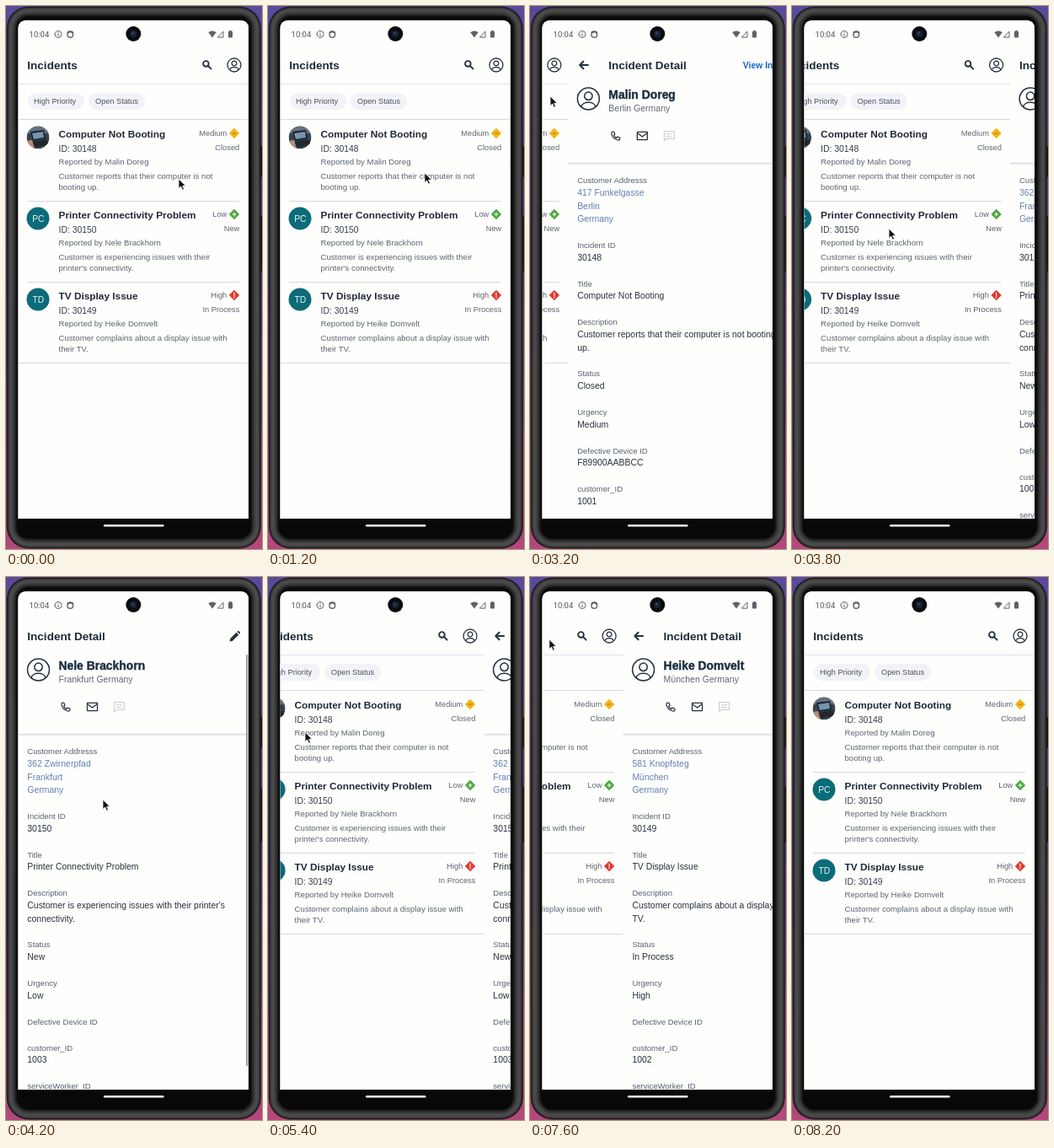
Recreate the animation shown at these times as an HTML page. Size 304 px wide and 644 px high, loop 8600 ms.

```html
<!DOCTYPE html>
<html lang="en">
<head>
<meta charset="utf-8">
<title>Incidents</title>
<style>
html, body { margin: 0; width: 100%; height: 100%; overflow: hidden; background: #201c3c; }
svg { display: block; width: 304px; height: 644px; }
text { font-family: "Liberation Sans", Arial, sans-serif; white-space: pre; }
.head { font: bold 13.55px "Liberation Sans", Arial, sans-serif; fill: #1f2a37; }
.row { font: bold 11.83px "Liberation Sans", Arial, sans-serif; fill: #1f2a37; }
.id { font-size: 10.4px; fill: #333e4a; }
.note { font-size: 9.65px; fill: #5c6570; }
.side { font-size: 9.3px; fill: #5c6570; }
.chip { font-size: 9.2px; fill: #4b5562; }
.name { font: bold 13.9px "Liberation Sans", Arial, sans-serif; fill: #1d2f40; stroke: #1d2f40; stroke-width: .4px; }
.city { font-size: 10.5px; fill: #5c6876; }
.label { font-size: 9.5px; fill: #56616e; }
.value { font-size: 10.45px; fill: #27323e; }
.link { font-size: 10.45px; fill: #6480b4; }
.act { font: bold 10.4px "Liberation Sans", Arial, sans-serif; fill: #1766c2; }
.clock { font: 9.5px Roboto, sans-serif; fill: #55555a; }
.init { font-size: 10.3px; fill: #e4f3f5; text-anchor: middle; }
.end { text-anchor: end; }
</style>
</head>
<body>
<svg id="stage" viewBox="0 0 304 644"></svg>
<script>
const LOOP = 8600, TICK = 200, WIDTH = 273;
const INK = '#27323e', PAPER = '#fefefd';

const people = [
  { name: 'Malin Doreg', city: 'Berlin', street: '417 Funkelgasse', id: '30148', title: 'Computer Not Booting',
    row: ['Customer reports that their computer is not', 'booting up.'],
    full: ['Customer reports that their computer is not booting', 'up.'],
    status: 'Closed', urgency: 'Medium', color: '#f3b414', mark: 'M-2 0H2', device: 'F89900AABBCC', customer: '1001' },
  { name: 'Nele Brackhorn', city: 'Frankfurt', street: '362 Zwirnerpfad', id: '30150', title: 'Printer Connectivity Problem',
    row: ['Customer is experiencing issues with their', 'printer\'s connectivity.'],
    full: ['Customer is experiencing issues with their printer\'s', 'connectivity.'],
    status: 'New', urgency: 'Low', color: '#4ba83c', mark: 'M-2 0H2M0 -2V2', initials: 'PC', customer: '1003' },
  { name: 'Heike Domvelt', city: 'München', street: '581 Knopfsteg', id: '30149', title: 'TV Display Issue',
    row: ['Customer complains about a display issue with', 'their TV.'],
    full: ['Customer complains about a display issue with their', 'TV.'],
    status: 'In Process', urgency: 'High', color: '#e2382c', mark: 'M0 -3V.8M0 2V3', initials: 'TD', customer: '1002' }
];

// start, end, share of the detail page before and after, person
const slides = [
  [1500, 2174, 0, 1, 0], [3100, 3578, 1, 0, 0],
  [3700, 4200, 0, 1, 1], [5000, 5506, 1, 0, 1],
  [6100, 6400, 0, 1, 2], [7400, 7900, 1, 0, 2]
];
// time, x, y
const pointer = [
  [0, 205, 205], [600, 186, 198], [2400, 186, 198], [2900, 30, 70], [3000, 30, 70],
  [3200, 24, 107], [3600, 115, 264], [4200, 115, 264], [4800, 31, 70], [5200, 31, 70],
  [5400, 44, 184], [5900, 67, 356], [6400, 67, 356], [7200, 30, 70], [7400, 30, 70], [8200, -16, 96]
];
// inset and colour of the phone's rounded edge, from outside in
const rim = [[0, '#1c1c1d'], [1.5, '#383839'], [3, '#4a4a4a'], [6.5, '#3f3f3f'], [8.5, '#2c2c2c'], [10.5, '#171717'], [12, '#080808']];

const text = (s, x, y, cls) => `<text x="${x}" y="${y}" class="${cls}">${s}</text>`;
const rect = (x, y, w, h, fill, r = 0) => `<rect x="${x}" y="${y}" width="${w}" height="${h}" rx="${r}" fill="${fill}"/>`;
const disc = (x, y, r, fill) => `<circle cx="${x}" cy="${y}" r="${r}" fill="${fill}"/>`;
const line = (d, color = INK, w = 1.3) =>
  `<path d="${d}" fill="none" stroke="${color}" stroke-width="${w}" stroke-linecap="round" stroke-linejoin="round"/>`;
const at = (x, y, s, k = 1) => `<g transform="translate(${x} ${y}) scale(${k})">${s}</g>`;
const group = (id, s) => `<g id="${id}">${s}</g>`;

const person = w => line('M-8 0a8 8 0 1 0 16 0a8 8 0 1 0 -16 0M-2.9 -2a2.9 2.9 0 1 0 5.8 0a2.9 2.9 0 1 0 -5.8 0' +
  'M-5.2 5.9C-4.6 1.6 4.6 1.6 5.2 5.9', INK, w);
const phone = line('M-4.6 -4.6L-2.4 -5L-1 -2L-2.4 -.8Q-1.2 1.4 .8 2.4L2 1L5 2.4L4.6 4.6Q4 5.4 2.4 5Q-4 3 -5 -2.4Q-5.3 -4 -4.6 -4.6Z', INK, 1.2);
const mail = line('M-6 -4.6H6V4.6H-6ZM-6 -3.6L0 1L6 -3.6', INK, 1.3);
const chat = line('M-6 -5.4H6V3.4H-3L-6 6ZM-3 -2.5H3M-3 .4H2', '#cdd0d5', 1.2);
const pencil = `<path d="M-6 6L-5.2 2.4L2 -4.8L4.8 -2L-2.4 5.2ZM2.9 -5.6L4.1 -6.6Q5 -6.8 6.2 -5.4Q6.8 -4.6 6.4 -4L5.6 -2.9Z" fill="${INK}"/>`;

function photo() {
  return `<g clip-path="url(#round)">` + disc(38, 156, 13.5, '#39434c') + rect(24, 142, 28, 9, '#65727b') +
    `<path d="M29 149L45 147L47 157L32 160Z" fill="#172331"/><path d="M31 151L44 149L45 156L33 158Z" fill="#7595ad"/>` +
    `<path d="M31 161L48 158L51 164L35 168Z" fill="#20272d"/><path d="M24 160L31 159L34 170H26Z" fill="#b78f7d"/></g>`;
}

function listRow(p, i) {
  const avatar = p.initials
    ? disc(38, 156, 13.5, '#0c6b78') + text(p.initials, 38.3, 160, 'init') : photo();
  const diamond = `<path d="M0 -6.2L6.2 0L0 6.2L-6.2 0Z" fill="${p.color}"/>` + line(p.mark, i ? '#fff' : '#b97808', 1.1);
  return at(0, i * 96, avatar + text(p.title, 62.5, 156, 'row') + text('ID: ' + p.id, 62.5, 173, 'id') +
    text('Reported by ' + p.name, 62.5, 188, 'note') +
    p.row.map((s, n) => text(s, 62.5, 205 + n * 13, 'note')).join('') +
    text(p.urgency, 262.3, 154, 'side end') + text(p.status, 277.3, 171.3, 'side end') + at(271, 151, diamond) +
    (i < 2 ? rect(25, 231, 252, 1, '#d9dade') : rect(15, 231, WIDTH, 1, '#d9dade')));
}

function listPage() {
  return rect(14, 17, WIDTH + 1, 592, PAPER) + text('Incidents', 25.3, 75, 'head') +
    at(238, 69, line('M-3.9 -.6a3.3 3.3 0 1 0 6.6 0a3.3 3.3 0 1 0 -6.6 0M2 2L5.6 5.6', INK, 1.9)) +
    at(271, 70, person(1.3)) + rect(14, 92, WIDTH + 1, 1, '#dfe2ee') +
    rect(26, 103, 67, 20, '#f2f2f8', 10) + rect(98, 103, 67, 20, '#f2f2f8', 10) +
    text('High Priority', 33, 116, 'chip') + text('Open Status', 106, 116, 'chip') +
    rect(14, 134, WIDTH + 1, 1, '#d9dade') + people.map(listRow).join('');
}

function detailPage(p, i) {
  let s = at(38.5, 110, person(.95), 1.62) + text(p.name, 62.5, 109.5, 'name') + text(p.city + ' Germany', 62.5, 125, 'city') +
    at(71, 154, phone) + at(102.5, 154, mail) + at(134.5, 154, chat) + rect(14.5, 185.5, WIDTH + 1, 2.5, '#e5e6ea') +
    text('Customer Addresss', 25.3, 210, 'label');
  [p.street, p.city, 'Germany'].forEach((a, n) => s += text(a, 25.3, 225 + n * 15.6, 'link'));
  let y = 287;
  const fields = [['Incident ID', p.id], ['Title', p.title], ['Description', ...p.full], ['Status', p.status],
    ['Urgency', p.urgency], ['Defective Device ID', p.device], ['customer_ID', p.customer], ['serviceWorker_ID']];
  for (const [label, ...values] of fields) {
    s += text(label, 25.3, y, 'label');
    const shown = values.filter(Boolean);
    shown.forEach((v, n) => s += text(v, 25.3, y + 14.7 + n * 15.6, 'value'));
    y += 31 + (shown.length ? 14.6 + (shown.length - 1) * 15.6 : 0);
  }
  return group('person' + i, s);
}

function detailHeads() {
  return group('fresh', text('Incident Detail', 25.3, 75, 'head') + at(271.5, 70.5, pencil)) +
    group('ready', line('M38 70H28.5M32.5 65.8L28.3 70L32.5 74.2', INK, 2.1) +
      text('Incident Detail', 62.3, 75, 'head') + text('View In Map', 222, 74, 'act'));
}

function body() {
  return rect(0, 0, 304, 644, 'url(#wall)') +
    rect(301, 166, 3, 37, '#17171a', 1) + rect(301, 249, 3, 66, '#17171a', 1) +
    rim.map(([d, c]) => rect(.8 + d, .5 + d, 302 - 2 * d, 643 - 2 * d, c, 26 - d)).join('');
}

function statusBar() {
  const grey = '#606066';
  return text('10:04', 27.6, 37, 'clock') +
    line('M58 33.5a4 4 0 1 0 8 0a4 4 0 1 0 -8 0M62 33.2V35.6M62 31.3V31.4', grey, 1) +
    line('M73 34a3.3 3.3 0 1 0 6.6 0a3.3 3.3 0 1 0 -6.6 0M73 31.2Q76.3 28.6 79.6 31.2', grey, 1.4) +
    disc(151.3, 33, 9, '#0b0c10') + disc(151.3, 33, 4, '#1b2233') + disc(150.6, 32.2, 1.3, '#39476a') +
    `<path d="M240.3 31.2Q245 27.6 249.7 31.2L245 37.4Z" fill="${grey}"/>` +
    line('M251.8 37.1H258V30.6Z', grey, 1) + rect(264, 30, 5, 7.6, grey, 1) + rect(265.3, 29, 2.4, 2, grey);
}

const stage = document.getElementById('stage');
stage.innerHTML = `<defs>
  <linearGradient id="wall" x1="0" y1="0" x2="0" y2="1">
    <stop offset="0" stop-color="#5a4a9c"/><stop offset=".5" stop-color="#4a3a78"/><stop offset="1" stop-color="#b5487c"/>
  </linearGradient>
  <clipPath id="round"><circle cx="38" cy="156" r="13.5"/></clipPath>
  <clipPath id="screen"><path d="M14.5 608V27Q14.5 17 24.5 17H278Q288 17 288 27V608Z"/></clipPath>
  </defs>` + body() +
  `<g clip-path="url(#screen)">` + rect(14, 17, WIDTH + 1, 592, PAPER) + group('list', listPage()) +
  group('detail', rect(14.5, 17, WIDTH + 1, 592, PAPER) + detailHeads() + people.map(detailPage).join('') +
    group('bar', rect(285, 92, 2.5, 488, '#a2a3a7', 1))) + statusBar() + '</g>' +
  rect(116, 615, 71.5, 2.6, '#f4f4f4', 1.3) +
  group('arrow', `<path d="M0 0V11.4L2.7 9L4.5 13.2L6.5 12.3L4.7 8.3H8.3Z" fill="#111" stroke="#fff" stroke-width=".8"/>`);

const part = id => document.getElementById(id);
const move = (id, x, y = 0) => part(id).setAttribute('transform', `translate(${x} ${y})`);
const show = (id, on) => part(id).setAttribute('visibility', on ? 'visible' : 'hidden');
const clamp = u => Math.min(1, Math.max(0, u));
const ease = u => u * u * (3 - 2 * u);

function pointerAt(t) {
  const n = pointer.findIndex(k => k[0] > t);
  if (n < 0) return pointer[pointer.length - 1].slice(1);
  const [t0, x0, y0] = pointer[n - 1], [t1, x1, y1] = pointer[n];
  const u = ease((t - t0) / (t1 - t0));
  return [x0 + (x1 - x0) * u, y0 + (y1 - y0) * u];
}

function draw(t) {
  let open = 0, who = 0, opened = 0;
  for (const [start, end, from, to, i] of slides) {
    if (t < start) break;
    open = from + (to - from) * ease(clamp((t - start) / (end - start)));
    who = i;
    if (to) opened = end;
  }
  move('list', -WIDTH * open);
  move('detail', WIDTH * (1 - open));
  people.forEach((p, i) => show('person' + i, i === who));
  const ready = t >= opened + 150;
  show('fresh', !ready);
  show('ready', ready);
  show('bar', open === 1 && t < opened + 500);
  move('arrow', ...pointerAt(t));
}

const began = performance.now();
function frame(now) {
  const t = Math.max(0, now - began) % LOOP;
  draw(Math.floor(t / TICK) * TICK);
  requestAnimationFrame(frame);
}
draw(0);
requestAnimationFrame(frame);
</script>
</body>
</html>
```
